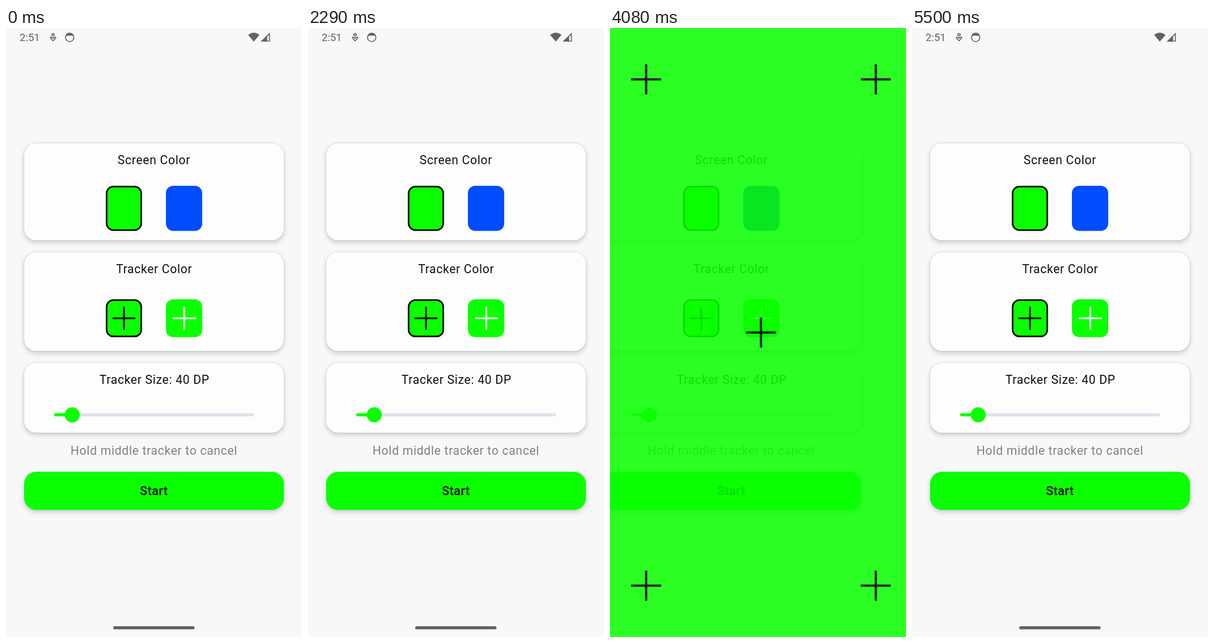
Animation of 522 by 1073 pixels, one loop 5540 ms. Source, as an HTML page:

```html
<!DOCTYPE html>
<html lang="en">
<head>
<meta charset="utf-8">
<title>Tracker screen</title>
<style>
  html, body { margin: 0; height: 100%; overflow: hidden; background: #f8f8fa; }
  svg { display: block; width: 100vw; height: 100vh; }
  text { font: 21.2px Roboto, sans-serif; letter-spacing: .66px; fill: #111; }
  .label { text-anchor: middle; }
  .card { fill: #fdfdfd; }
  .raised { filter: drop-shadow(0 0 1px #0003) drop-shadow(0 4px 4px #0000002e); }
  .green { fill: #0aff00; }
  .system { fill: #000; }
  .system text { font-size: 18.5px; letter-spacing: 0; fill: #000; }
</style>
</head>
<body>
<svg viewBox="0 0 522 1073">
  <defs>
    <path id="tracker" d="M-26.5 0H26.5M0-26.5V26.5" stroke="#000" stroke-width="4"/>
    <path id="plus" d="M-20.3 0H20.3M0-20.3V20.3" stroke-width="3"/>
  </defs>
  <rect width="522" height="1073" fill="#f8f8fa"/>

  <g id="form">
    <g class="raised">
      <rect class="card" x="32" y="203" width="458" height="171" rx="21"/>
      <rect class="card" x="32" y="395" width="458" height="174" rx="21"/>
      <rect class="card" x="32" y="590" width="458" height="123" rx="21"/>
      <rect class="green" x="32" y="782" width="458" height="67" rx="21"/>
    </g>
    <rect id="press" x="32" y="782" width="458" height="67" rx="21" opacity="0"/>

    <text class="label" x="261" y="240">Screen Color</text>
    <rect class="green" x="177.4" y="279.4" width="61.2" height="76.7" rx="12" stroke="#000" stroke-width="2.8"/>
    <rect x="282" y="278" width="64" height="79.5" rx="13" fill="#004cff"/>

    <text class="label" x="261.3" y="432">Tracker Color</text>
    <rect class="green" x="177.4" y="479.4" width="61.2" height="64" rx="12" stroke="#000" stroke-width="2.8"/>
    <rect class="green" x="282" y="478" width="64" height="66.7" rx="13"/>
    <use href="#plus" x="208" y="511.5" stroke="#000"/>
    <use href="#plus" x="314.5" y="511.5" stroke="#fff"/>

    <text class="label" x="261.8" y="627">Tracker Size: 40 DP</text>
    <g stroke-width="5.3" stroke-linecap="round">
      <path d="M87.5 681.5H434.5" stroke="#e0e0ec"/>
      <path d="M87.5 681.5H117" stroke="#0aff00"/>
    </g>
    <circle class="green" cx="116.8" cy="681.5" r="13.3"/>

    <text class="label" x="261" y="752" style="fill:#808080">Hold middle tracker to cancel</text>
    <text class="label" x="261" y="823" style="font-weight:500;fill:#000">Start</text>
  </g>

  <g id="screen">
    <rect class="green" x="-60" width="642" height="1073"/>
    <use href="#tracker" x="58.5" y="90.5"/>
    <use href="#tracker" x="463.5" y="90.5"/>
    <use href="#tracker" x="261" y="536.5"/>
    <use href="#tracker" x="58.5" y="982.5"/>
    <use href="#tracker" x="463.5" y="982.5"/>
  </g>

  <g class="system" id="status">
    <text x="24" y="23.3">2:51</text>
    <g fill="none" stroke="#000" stroke-width="1.7">
      <circle cx="83" cy="11.8" r="2"/>
      <path d="M83 22.5L78 17.5Q79 14.5 83 18Q87 14.5 88 17.5Z"/>
      <circle cx="112.3" cy="16.5" r="7.4"/>
    </g>
    <path d="M105 16Q105 9 112.3 9T119.6 16L117.5 13.5H107.5Z"/>
    <path d="M437 24L427 12.2Q437 4.2 447 12.2Z"/>
    <path fill-rule="evenodd" d="M449 24L465.3 8V24ZM460.5 15.2V22.5H463.6V12.3Z"/>
  </g>
  <rect class="system" id="handle" x="189" y="1054" width="143.5" height="5.6" rx="2.8"/>
</svg>
<script>
const LOOP = 5540, STEP = 1000 / 24;
const OPEN = 2483, CLOSE = 4037, SLIDE = 450, SHIFT = 52.2;
const BARS_HIDE = 2460, BARS_SHOW = 4125, BAR_OPACITY = .6;

const $ = id => document.getElementById(id);
const ramp = (t, start, length) => Math.min(1, Math.max(0, (t - start) / length));
const cubic = (a, b, c, d, u) => {
  const v = 1 - u;
  return a * v ** 3 + 3 * b * u * v * v + 3 * c * u * u * v + d * u ** 3;
};

// Solves one Bezier segment for y at a given x.
function curve(xs, ys, x) {
  let low = 0, high = 1;
  for (let i = 0; i < 24; i++) {
    const mid = (low + high) / 2;
    if (cubic(...xs, mid) < x) low = mid; else high = mid;
  }
  return cubic(...ys, low);
}

const slideEase = x => x < 1 / 6
  ? curve([0, .05, .13333, 1 / 6], [0, 0, .06, .4], x)
  : curve([1 / 6, .20833, .25, 1], [.4, .82, 1, 1], x);
const barEase = x => curve([0, .4, .2, 1], [0, 0, 1, 1], x);

function move(node, x, y, opacity) {
  node.setAttribute("transform", `translate(${x} ${y})`);
  node.setAttribute("opacity", opacity);
}

function draw(t) {
  const closing = t >= CLOSE;
  const slide = slideEase(ramp(t, closing ? CLOSE : OPEN, SLIDE));
  const cover = closing ? 1 - ramp(t, CLOSE + 35, 83) : ramp(t, OPEN + 50, 83);
  move($("form"), -SHIFT * (closing ? 1 - slide : slide), 0, 1);
  move($("screen"), SHIFT * (closing ? slide : 1 - slide), 0, cover);
  $("press").setAttribute("opacity", closing ? 0 : .1 * ramp(t, 2400, 80));

  const showing = t >= BARS_SHOW;
  const hidden = showing ? 0 : barEase(ramp(t, BARS_HIDE, 340));
  const opacity = BAR_OPACITY * (showing ? ramp(t, BARS_SHOW, 250) : 1 - hidden ** 4);
  move($("status"), 0, -32 * hidden, opacity);
  move($("handle"), 0, 34 * hidden, opacity);
}

function tick() {
  const t = performance.now() % LOOP;
  draw(Math.floor((t + 5) / STEP) * STEP);
  requestAnimationFrame(tick);
}
tick();
</script>
</body>
</html>
```
